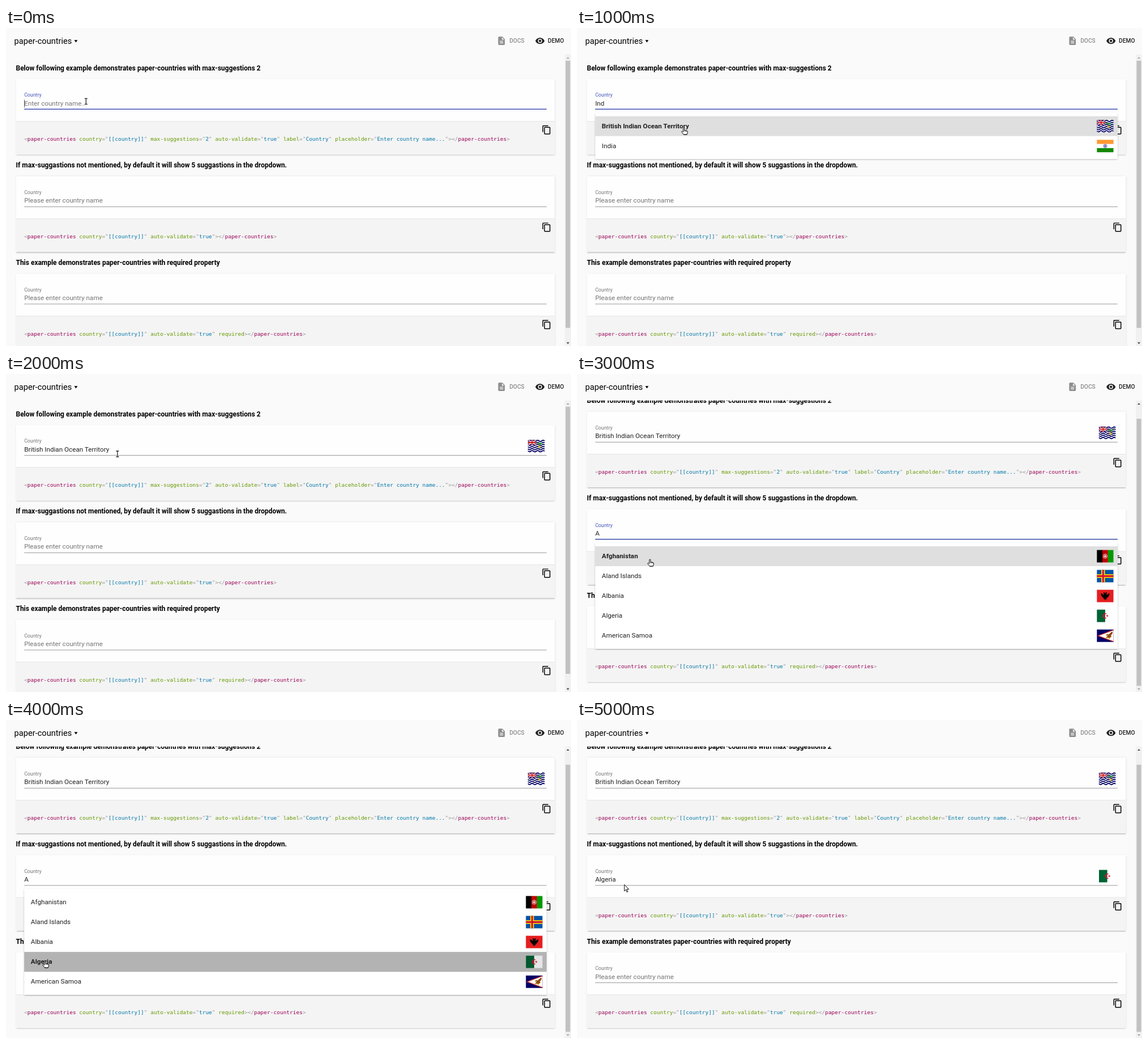
These frames come from a looping animation (998 by 561 pixels, 6 s). An HTML page:

```html
<!DOCTYPE html>
<html lang="en">
<head>
<meta charset="utf-8">
<title>paper-countries demo</title>
<style>
html, body { margin: 0; width: 100%; height: 100%; overflow: hidden; background: #fafafa; }
/* Laid out at 1366 x 768 and scaled down to the stage. */
#stage { position: absolute; width: 1366px; height: 768px; transform: scale(.7306); transform-origin: 0 0;
  font: 16px/24px Roboto, sans-serif; color: #212121; }
#stage div, #stage svg { position: absolute; white-space: nowrap; }
svg { overflow: visible; }

.title { left: 20px; top: 20px; font-size: 20px; color: #000; }
.tab { top: 19px; font-size: 14px; font-weight: 500; }
.view { left: 0; top: 64px; width: 1351px; height: 704px; overflow: hidden; }
.page { left: 0; top: -64px; animation: scroll 6s step-end infinite; }
.section { left: 0; }
h3 { position: absolute; margin: 0; left: 24px; top: 85px; font-size: 16.38px; font-weight: 700; color: #000; }
.card { left: 24px; top: 123px; width: 1303px; height: 183px; background: #fefefe;
  box-shadow: 0 2px 2px rgba(0,0,0,.14), 0 1px 5px rgba(0,0,0,.12), 0 3px 1px -2px rgba(0,0,0,.2); }
.code { left: 24px; top: 225px; width: 1303px; height: 80px; background: #f4f4f4; border-top: 1px solid #e0e0e0; }
.code div { left: 20px; top: 31px; font: 13px/24px "DejaVu Sans Mono", monospace; color: #999; }
.code b { font-weight: 400; color: #905; }
.code i { font-style: normal; color: #690; }
.code u { text-decoration: none; color: #07a; }
.label { left: 44px; top: 150px; font-size: 12px; color: #737373; }
.text { left: 44px; top: 170px; }
.hint { color: #757575; }
.line { left: 44px; top: 196px; width: 1263px; height: 1px; background: #737373; }
.focus.label { color: #3f51b5; }
.focus.line { top: 195px; height: 2px; background: #3f51b5; }
.caret { left: 44px; top: 173px; width: 1px; height: 19px; background: #212121; }
.menu { left: 44px; width: 1263px; padding: 8px 0; background: #fff;
  box-shadow: 0 2px 2px rgba(0,0,0,.14), 0 1px 5px rgba(0,0,0,.12), 0 3px 1px -2px rgba(0,0,0,.2); }
#stage .row { position: relative; height: 48px; line-height: 48px; padding-left: 16px; }
.row svg { left: 1213px; top: 9px; }
.hot { background: #dfdfdf; font-weight: 700; }
.pressed { background: #c7c7c7; }
.pressed::after { content: ""; position: absolute; inset: 0; background: rgba(0,0,0,.1); }
.track { left: 1351px; top: 64px; width: 15px; height: 704px; background: #f1f1f1; }
.thumb { left: 2px; top: 15px; width: 11px; height: 645px; background: #c1c1c1; animation: thumb 6s step-end infinite; }

.show { visibility: hidden; animation: 6s step-end infinite; animation-delay: calc(var(--at) * 1s - 6s); }
@keyframes on1 { 0% { visibility: visible } 16.666%, 100% { visibility: hidden } }
@keyframes on2 { 0% { visibility: visible } 33.333%, 100% { visibility: hidden } }
@keyframes on3 { 0% { visibility: visible } 49.999%, 100% { visibility: hidden } }
@keyframes on4 { 0% { visibility: visible } 66.666%, 100% { visibility: hidden } }
@keyframes on5 { 0% { visibility: visible } 83.333%, 100% { visibility: hidden } }
@keyframes scroll { 0% { top: -64px } 49.999%, 100% { top: -96px } }
@keyframes thumb { 0% { top: 15px } 49.999%, 100% { top: 44px } }
</style>
</head>
<body>
<div id="stage"></div>
<script>
// Visible from second `at` for `span` seconds of the six-second loop.
const during = (at, span) => `--at:${at};animation-name:on${span}`;
const show = (at, span, cls, html = '') => `<div class="show ${cls}" style="${during(at, span)}">${html}</div>`;
const svg = (x, y, w, h, body, attrs = '') =>
  `<svg style="left:${x}px;top:${y}px" width="${w}" height="${h}" viewBox="0 0 ${w} ${h}" ${attrs}>${body}</svg>`;
const path = (d, attrs = '') => `<path d="${d}" ${attrs}/>`;
const rect = (x, y, w, h, fill) => `<rect x="${x}" y="${y}" width="${w}" height="${h}" fill="${fill}"/>`;
const stroke = (color, width) => `fill="none" stroke="${color}" stroke-width="${width}"`;

const waves = [1.5, 6.5, 11.5, 16.5, 21.5, 26.5]
  .map(y => path(`M0 ${y}q3.3 4 6.6 1t6.7 0 6.7 0 6.7 0 6.7 0 6.6 0`, stroke('#000063', 2.4))).join('');
const saltire = 'M0 0L20 13M20 0L0 13', cross = 'M10 0V13M0 6.5H20';
const crescent = 'M24.5 10.5a6 6 0 1 0 0 9a4.8 4.8 0 1 1 0-9z';
const star = 'M21.5 15l2.3-.8V11.800l1.500 2 2.300-.8-1.400 2 1.400 2-2.300-.8-1.500 2v-2.400z';
const eagle = 'M20 6l1 2 3-2 .5 2-2 2 1 2 7-4-1 4 1 2-3 1 1 2-3 1v2l-3-1 2 4-3-1-1.500 4-1.500-4-3 1 2-4-3 1v-2l-3-1 1-2-3-1 1-2-1-4 7 4 1-2-2-2 .5-2 3 2z';

const flags = {
  'British Indian Ocean Territory': rect(0, 0, 40, 30, '#fff') + waves + rect(0, 0, 20, 13, '#000063')
    + path(saltire, stroke('#fff', 2.6)) + path(saltire, stroke('#c00', 1))
    + path(cross, stroke('#fff', 4)) + path(cross, stroke('#c00', 2.2))
    + path('M28 9V22', stroke('#8a5b2b', 1.8))
    + path('M28 8q-5-4-6 2l4-1-2 5 4-4 4 4-1-5 4 1q-2-6-7-2z', 'fill="#279a3c"')
    + path('M25 15h6l-1 4h-4z', 'fill="#e8c52c"'),
  'India': rect(0, 0, 40, 30, '#fff') + rect(0, 0, 40, 10, '#f93') + rect(0, 20, 40, 10, '#128807')
    + `<circle cx="20" cy="15" r="4" ${stroke('#000088', 1)}/><circle cx="20" cy="15" r="1.6" fill="#000088"/>`,
  'Afghanistan': rect(0, 0, 14, 30, '#000') + rect(13.3, 0, 13.4, 30, '#bf0000') + rect(26.7, 0, 13.3, 30, '#009900')
    + `<circle cx="20" cy="15" r="5" ${stroke('#eed5d5', 1.3)}/>` + path('M17.500 17v-3q2.500-3 5 0v3zM20 9v3', 'fill="#eed5d5" stroke="#eed5d5" stroke-width=".8"'),
  'Aland Islands': rect(0, 0, 40, 30, '#0053a5') + path('M15 0V30M0 15H40', stroke('#ffce00', 9)) + path('M15 0V30M0 15H40', stroke('#d21034', 4)),
  'Albania': rect(0, 0, 40, 30, '#e41e20') + path(eagle),
  'Algeria': rect(0, 0, 40, 30, '#fff') + rect(0, 0, 20, 30, '#006233') + path(crescent + star, 'fill="#d21034"'),
  'American Samoa': rect(0, 0, 40, 30, '#000066') + path('M40 0L0 15 40 30z', 'fill="#c1272d"') + path('M40 2L5 15 40 28z', 'fill="#fff"')
    + path('M38 5q-5 1-9 7l-4-1-4 3 5 1-5 5 6 0 3 3 2-4 3-1-1-4q4-3 4-9z', 'fill="#8a4b12"')
    + path('M21 19l11 2M23 14l4 0', stroke('#e8b830', 1.4))
};
const flag = (name, x = 1213, y = 9) => svg(x, y, 40, 30, flags[name]);

const attr = ([name, value]) => ` <i>${name}</i>` + (value ? `="<u>${value}</u>"` : '');
const tagName = '<b>paper-countries</b>';
const code = attrs => `<div class="code"><div>&lt;${tagName}${attrs.map(attr).join('')}&gt;&lt;/${tagName}&gt;</div></div>`;
const copyIcon = svg(1295, 234, 24, 24,
  path('M16 1H4c-1.100 0-2 .9-2 2v14h2V3h12V1zm3 4H8c-1.100 0-2 .9-2 2v14c0 1.100.9 2 2 2h11c1.100 0 2-.9 2-2V7c0-1.100-.9-2-2-2zm0 16H8V7h11v14z'));

const section = (index, heading, attrs, field) => `<div class="section" style="top:${index * 235}px">
  <h3>${heading}</h3><div class="card"></div>${code(attrs)}${copyIcon}<div class="line"></div>${field}</div>`;
const label = '<div class="label">Country</div>';
const hint = 'Please enter country name';
const chosen = (at, span, name) => show(at, span, 'text', name) + show(at, span, '', flag(name, 1262, 159));

const menu = (at, top, names, hot, cls = 'hot') => `<div class="show menu" style="top:${top}px;${during(at, 1)}">${
  names.map((name, i) => `<div class="row ${i === hot ? cls : ''}">${name}${flag(name)}</div>`).join('')}</div>`;

const country = ['country', '[[country]]'], validate = ['auto-validate', 'true'];
const aNames = ['Afghanistan', 'Aland Islands', 'Albania', 'Algeria', 'American Samoa'];

const page = section(0, 'Below following example demonstrates paper-countries with max-suggestions 2',
    [country, ['max-suggestions', '2'], validate, ['label', 'Country'], ['placeholder', 'Enter country name...']],
    show(0, 2, 'label focus', 'Country') + show(2, 4, 'label', 'Country') + show(0, 2, 'line focus')
    + show(0, 1, 'text hint', 'Enter country name...') + show(0, 1, 'caret')
    + show(1, 1, 'text', 'Ind') + chosen(2, 4, 'British Indian Ocean Territory'))
  + section(1, 'If max-suggastions not mentioned, by default it will show 5 suggastions in the dropdown.',
    [country, validate],
    show(3, 1, 'label focus', 'Country') + show(4, 5, 'label', 'Country') + show(3, 1, 'line focus')
    + show(0, 3, 'text hint', hint) + show(3, 2, 'text', 'A') + chosen(5, 1, 'Algeria'))
  + section(2, 'This example demonstrates paper-countries with required property',
    [country, validate, ['required']], label + `<div class="text hint">${hint}</div>`)
  + menu(1, 205, ['British Indian Ocean Territory', 'India'], 0)
  + menu(3, 440, aNames, 0)
  + menu(4, 440, aNames, 3, 'hot pressed');

const outline = 'stroke-linejoin="round"';
const beam = 'M1 1h2.500l1 1 1-1H8M4.500 2v12M1 15h2.500l1-1 1 1H8';
const cursors = {
  beam: path(beam, stroke('#fff', 2.6)) + path(beam, stroke('#000', 1.5)),
  hand: path('M5 11V2q0-1.500 1.400-1.500T7.800 2v5l5.500 1q2 .4 2 2.200v3l-1.500 4H6L1.200 11.500q-1-1.800.6-2.200 1.500-.2 3.200 1.700z', `fill="#fff" stroke="#000" stroke-width="1.300" ${outline}`)
    + path('M8 7v3M10.600 7.800v2.400M13 8.200v2.200M5.500 17.200h8.500', stroke('#000', 1)),
  arrow: path('M.5.5v15.500l3.600-3.400 2.600 6 2.300-1-2.600-5.800h5z', `fill="#fff" stroke="#000" stroke-width="1.300" ${outline}`)
};
const cursor = (at, kind, x, y) => show(at, 1, '', svg(x, y, 17, 19, cursors[kind]));

const toolbarIcons = svg(1186, 19, 24, 24,
    path('M14 2H6c-1.100 0-2 .9-2 2v16c0 1.100.9 2 2 2h12c1.100 0 2-.9 2-2V8l-6-6zm2 16H8v-2h8v2zm0-4H8v-2h8v2zm-3-5V3.500L18.500 9H13z'), 'fill="#212121" opacity=".5"')
  + svg(1279, 19, 24, 24,
    path('M12 4.500C7 4.500 2.700 7.600 1 12c1.700 4.400 6 7.500 11 7.500s9.300-3.100 11-7.500c-1.700-4.400-6-7.500-11-7.500zM12 17a5 5 0 1 1 0-10a5 5 0 0 1 0 10zm0-8a3 3 0 1 0 0 6a3 3 0 0 0 0-6z'), 'fill="#212121"');

const arrowUp = color => svg(0, 0, 15, 15, path('M4 10h7L7.500 6z', `fill="${color}"`));
const arrowDown = color => svg(0, 689, 15, 15, path('M4 6h7L7.500 10z', `fill="${color}"`));
const scrollbar = `<div class="track"><div class="thumb"></div>${
  show(0, 3, '', arrowUp('#a3a3a3') + arrowDown('#404040'))
  + show(3, 3, '', arrowUp('#404040') + arrowDown('#a3a3a3'))}</div>`;

document.getElementById('stage').innerHTML = `
  <div class="title">paper-countries</div>
  ${svg(165, 28, 8, 7, path('M0 1h8L4 7z'))}${toolbarIcons}
  <div class="tab" style="left:1217px;opacity:.5">DOCS</div><div class="tab" style="left:1310px">DEMO</div>
  <div class="view"><div class="page">${page}</div></div>${scrollbar}`
  + cursor(0, 'beam', 189, 168.500) + cursor(1, 'hand', 252, 240) + cursor(2, 'beam', 265, 185)
  + cursor(3, 'hand', 170, 447) + cursor(4, 'hand', 88, 580.500) + cursor(5, 'arrow', 114, 397);
</script>
</body>
</html>
```
